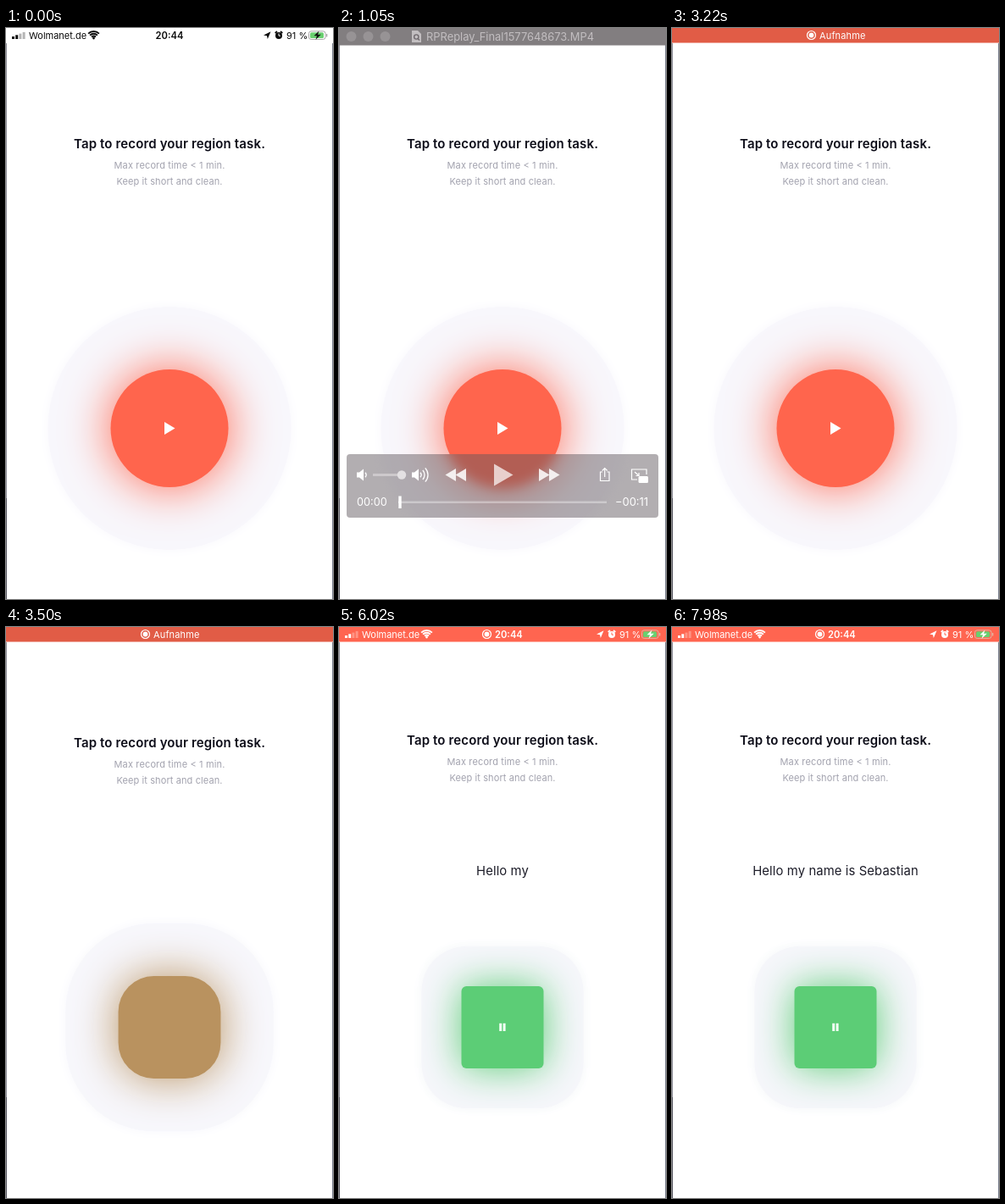
Recreate the animation shown at these times as an HTML page with a canvas. Size 386 by 674 pixels, loop 8000 ms.

```html
<!DOCTYPE html>
<html lang="en">
<head>
<meta charset="utf-8">
<title>Voice recording</title>
<style>
html, body { margin: 0; width: 100%; height: 100%; overflow: hidden; background: #fff; }
canvas { display: block; width: 100%; height: 100%; }
</style>
</head>
<body>
<canvas id="stage" width="386" height="674"></canvas>
<script>
const ctx = document.getElementById('stage').getContext('2d');
const W = 386, H = 674, LOOP = 8000, STEP = 70;
const CX = 193, CY = 472.5;
const PLAY_AT = 1960;
const FONT = 'Inter, "Noto Sans", sans-serif';

const clamp = x => Math.max(0, Math.min(1, x));
const lerp = (a, b, k) => a + (b - a) * k;
const ramp = (t, from, to) => {
  const k = clamp((t - from) / (to - from));
  return k * k * (3 - 2 * k);
};
const mix = (a, b, k) => `rgb(${a.map((v, i) => Math.round(lerp(v, b[i], k)))})`;

function withAlpha(alpha, draw) {
  if (alpha <= 0) return;
  ctx.save();
  ctx.globalAlpha *= alpha;
  draw();
  ctx.restore();
}

function text(str, x, y, size, color, align = 'center', weight = 400, spacing = 0) {
  ctx.font = `${weight} ${size}px ${FONT}`;
  ctx.letterSpacing = `${spacing}px`;
  ctx.textAlign = align;
  ctx.textBaseline = 'alphabetic';
  ctx.fillStyle = color;
  ctx.fillText(str, x, y);
}

function rect(x, y, w, h, color) {
  ctx.fillStyle = color;
  ctx.fillRect(x, y, w, h);
}

function box(x, y, w, h, r) {
  ctx.beginPath();
  ctx.roundRect(x, y, w, h, r);
}

function dot(x, y, r, color) {
  ctx.beginPath();
  ctx.arc(x, y, r, 0, Math.PI * 2);
  ctx.fillStyle = color;
  ctx.fill();
}

function poly(color, ...pts) {
  ctx.beginPath();
  for (let i = 0; i < pts.length; i += 2) ctx.lineTo(pts[i], pts[i + 1]);
  ctx.closePath();
  ctx.fillStyle = color;
  ctx.fill();
}

function line(color, width, ...pts) {
  ctx.beginPath();
  for (let i = 0; i < pts.length; i += 2) ctx.lineTo(pts[i], pts[i + 1]);
  ctx.strokeStyle = color;
  ctx.lineWidth = width;
  ctx.stroke();
}

function arc(x, y, r, from, to, color, width) {
  ctx.beginPath();
  ctx.arc(x, y, r, from, to);
  ctx.strokeStyle = color;
  ctx.lineWidth = width;
  ctx.stroke();
}

// Record button: red circle turning into a green rounded square

function buttonShape(k, grow = 0) {
  const half = lerp(69.5, 48.5, k) + grow;
  box(CX - half, CY - half, half * 2, half * 2, lerp(69.5, 6, k) + grow);
}

function drawButton(t) {
  const k = ramp(t, 3300, 3740);
  const color = mix([255, 101, 77], [92, 205, 118], k);

  ctx.save();
  const halo = mix([248, 247, 252], [246, 246, 251], k);
  ctx.fillStyle = ctx.shadowColor = halo;
  ctx.shadowBlur = 14;
  buttonShape(k, lerp(74, 47, k));
  ctx.fill();

  ctx.fillStyle = ctx.shadowColor = color;
  ctx.shadowBlur = lerp(56, 46, k);
  buttonShape(k);
  ctx.fill();
  ctx.restore();

  withAlpha(1 - ramp(t, 3300, 3500), () =>
    poly('#fff', 187, 465, 187, 480, 199.5, 472.5));
  withAlpha(ramp(t, 3500, 3780), () => {
    rect(189.2, 467.8, 3, 9.2, '#f2fff4');
    rect(193.6, 467.8, 3, 9.2, '#f2fff4');
  });
}

function drawPage(t) {
  rect(0, 0, W, H, '#fff');
  const lift = 3 * ramp(t, 5460, 5670);
  text('Tap to record your region task.', CX, 142 - lift, 15, '#0c0c18', 'center', 600, 0.14);
  text('Max record time < 1 min.', CX, 166 - lift, 11, '#a2a2ae', 'center', 400, 0.14);
  text('Keep it short and clean.', CX, 185 - lift, 11, '#a2a2ae', 'center', 400, 0.1);
  drawButton(t);

  const words = [[5530, 'Hello'], [5880, 'my'], [6440, 'name'], [6790, 'is'], [7280, 'Sebastian']];
  const said = words.filter(w => t >= w[0]).map(w => w[1]).join(' ');
  text(said, CX, 292.5, 14.85, '#1c1c28', 'center', 400, 0.1);
}

// Phone status bar

function statusIcons(ink, time, recording) {
  for (let i = 0; i < 4; i++) {
    withAlpha(i < 2 ? 1 : 0.3, () => rect(7 + i * 4.2, 10 - i * 1.7, 3, 3 + i * 1.7, ink));
  }
  text('Wolmanet.de', 27, 12.8, 11, ink, 'left');

  for (const r of [3.4, 6.2, 9]) {
    arc(103.5, 13, r, -Math.PI * 0.75, -Math.PI * 0.25, ink, 2);
  }
  dot(103.5, 12, 1.4, ink);

  if (recording) {
    recordMark(174.5, 8.5);
    text(time, 184, 12.7, 11.2, ink, 'left', 600);
  } else {
    text(time, CX, 12.7, 11.2, ink, 'center', 600);
  }

  poly(ink, 304, 8.5, 312.5, 4.3, 308.8, 13, 308, 9.2);
  dot(322, 9, 4, ink);
  line(ink, 1.8, 317.7, 6, 320, 4);
  line(ink, 1.8, 324, 4, 326.3, 6);
  line(recording ? '#ff6550' : '#fff', 1, 322, 6.5, 322, 9.2, 323.9, 9.2);
  text('91 %', 331, 12.7, 11, ink, 'left');

  const shell = recording ? '#e3b3a2' : '#a5a5a5';
  box(357.5, 3.8, 19.5, 9.6, 2.6);
  ctx.strokeStyle = shell;
  ctx.lineWidth = 1;
  ctx.stroke();
  box(359, 5.2, 16, 6.8, 1.5);
  ctx.fillStyle = '#69cf70';
  ctx.fill();
  rect(378, 7, 1.3, 3.4, shell);
  poly(recording ? '#fff' : '#111', 369.5, 3.5, 363.5, 9.3, 367, 9.3, 365.5, 13.8, 371.8, 7.7, 368, 7.7);
}

function recordMark(x, y) {
  arc(x, y, 5, 0, Math.PI * 2, '#fff', 1.2);
  dot(x, y, 2.9, '#fff');
}

function drawStatus(t) {
  const red = ramp(t, 1960, 2310);
  const label = ramp(t, 2380, 2660) * (1 - ramp(t, 5320, 5460));
  const bright = ramp(t, 5390, 5670);

  withAlpha(red, () => rect(0, 0, W, 17.5, mix([225, 92, 70], [255, 101, 80], bright)));
  withAlpha(1 - red, () => statusIcons('#0a0a0a', '20:44', false));
  withAlpha(t < 4000 ? red * (1 - label) : bright, () => statusIcons('#fff', '20:44', true));
  withAlpha(label, () => {
    recordMark(164.5, 8.5);
    text('Aufnahme', 174, 12.5, 11, '#fff', 'left', 400, 0.15);
  });
}

// Movie player window chrome

function drawTitleBar(active) {
  withAlpha(lerp(1, 0.95, active), () =>
    rect(0, 0, W, 20.5, mix([130, 126, 128], [154, 121, 120], active)));
  const lights = [[238, 102, 92], [243, 188, 78], [100, 197, 88]];
  lights.forEach((c, i) => dot(14.5 + i * 20, 10, 6, mix([151, 147, 149], c, active)));

  const ink = mix([194, 190, 192], [246, 240, 240], active);
  poly(ink, 86, 3, 93, 3, 97, 7, 97, 17, 86, 17);
  arc(91.3, 10.5, 2.6, 0, Math.PI * 2, '#6f696d', 1.4);
  line('#6f696d', 1.4, 93, 12.3, 95, 14.5);
  text('RPReplay_Final1577648673.MP4', 103, 14.7, 12.9, ink, 'left');
}

function speaker(x, waves) {
  poly('#fff', x, 524.5, x + 3, 524.5, x + 8, 520.5, x + 8, 534.5, x + 3, 530.5, x, 530.5);
  for (let i = 0; i < waves; i++) {
    arc(x + 7, 527.5, 4 + i * 4, -0.75, 0.75, '#fff', 1.3);
  }
}

function skip(x, dir, color) {
  for (const s of [0, 12]) {
    const a = x + s + (dir < 0 ? 12 : 0);
    poly(color, a, 520, a, 535, a + dir * 12.5, 527.5);
  }
}

function drawControls(t, active) {
  const panel = () => box(9, 503, 368, 75, 4);

  ctx.save();
  panel();
  ctx.clip();
  ctx.filter = 'blur(7px)';
  rect(-20, 480, W + 40, 130, '#fff');
  drawButton(t);
  ctx.filter = 'none';
  ctx.restore();

  panel();
  ctx.fillStyle = `rgba(${lerp(95, 122, active)},${lerp(87, 113, active)},${lerp(92, 118, active)},${lerp(0.48, 0.36, active)})`;
  ctx.fill();

  const knob = lerp(74, 76, active);
  speaker(21, 1);
  rect(40, 526, 36, 3, mix([205, 201, 204], [116, 168, 244], active));
  dot(knob, 527.5, 5.2, mix([228, 225, 227], [244, 241, 243], active));
  speaker(lerp(86, 88, active), 3);

  const soft = 'rgba(255,255,255,.85)';
  skip(126, -1, soft);
  skip(236, 1, soft);
  if (t < PLAY_AT) {
    const pressed = t >= 1050 && t < 1120;
    poly(pressed ? 'rgba(255,255,255,.7)' : soft, 183, 514.5, 183, 540.5, 205.5, 527.5);
  } else {
    rect(183, 516, 8, 24, 'rgba(255,255,255,.62)');
    rect(195, 516, 8, 24, 'rgba(255,255,255,.62)');
  }

  line('#fff', 1.2, 311, 524, 308.5, 524, 308.5, 534.5, 319, 534.5, 319, 524, 316.5, 524);
  line('#fff', 1.2, 313.7, 530, 313.7, 520);
  line('#fff', 1.2, 310.8, 522.5, 313.7, 519.5, 316.6, 522.5);

  line('#fff', 1.2, 352, 533, 345.5, 533, 345.5, 521, 363, 521, 363, 527);
  line('#fff', 1.2, 349, 524, 354, 528.5);
  line('#fff', 1.2, 354, 525, 354, 528.5, 350.5, 528.5);
  box(353.5, 529, 11.5, 8, 1.5);
  ctx.fillStyle = '#fff';
  ctx.fill();

  const head = 72 + Math.max(0, t - PLAY_AT) * 0.0222;
  rect(70, 558.5, 246, 2.5, 'rgba(255,255,255,.35)');
  rect(70, 558.5, head - 70, 2.5, 'rgba(255,255,255,.6)');
  rect(head - 1.7, 552.5, 3.4, 14.5, '#fff');
  text('00:00', 21, 564.3, 12.7, '#fff', 'left');
  text('−00:11', 365, 564.3, 12.9, '#fff', 'right');
}

function drawPlayer(t) {
  const shown = ramp(t, 50, 400) * (1 - ramp(t, 2400, 2740));
  const active = ramp(t, 1240, 1470);
  withAlpha(shown, () => {
    drawTitleBar(active);
    drawControls(t, active);
  });
}

function drawEdges() {
  rect(0, 18, 1, H - 18, '#92929c');
  rect(0, 555, 1, H - 555, '#5c5c66');
  rect(W - 1, 18, 1, H - 18, '#7c8290');
}

function frame() {
  const now = performance.now() % LOOP;
  const t = Math.floor(now / STEP) * STEP;
  drawPage(t);
  drawStatus(t);
  drawEdges();
  drawPlayer(t);
  requestAnimationFrame(frame);
}
frame();
</script>
</body>
</html>
```
